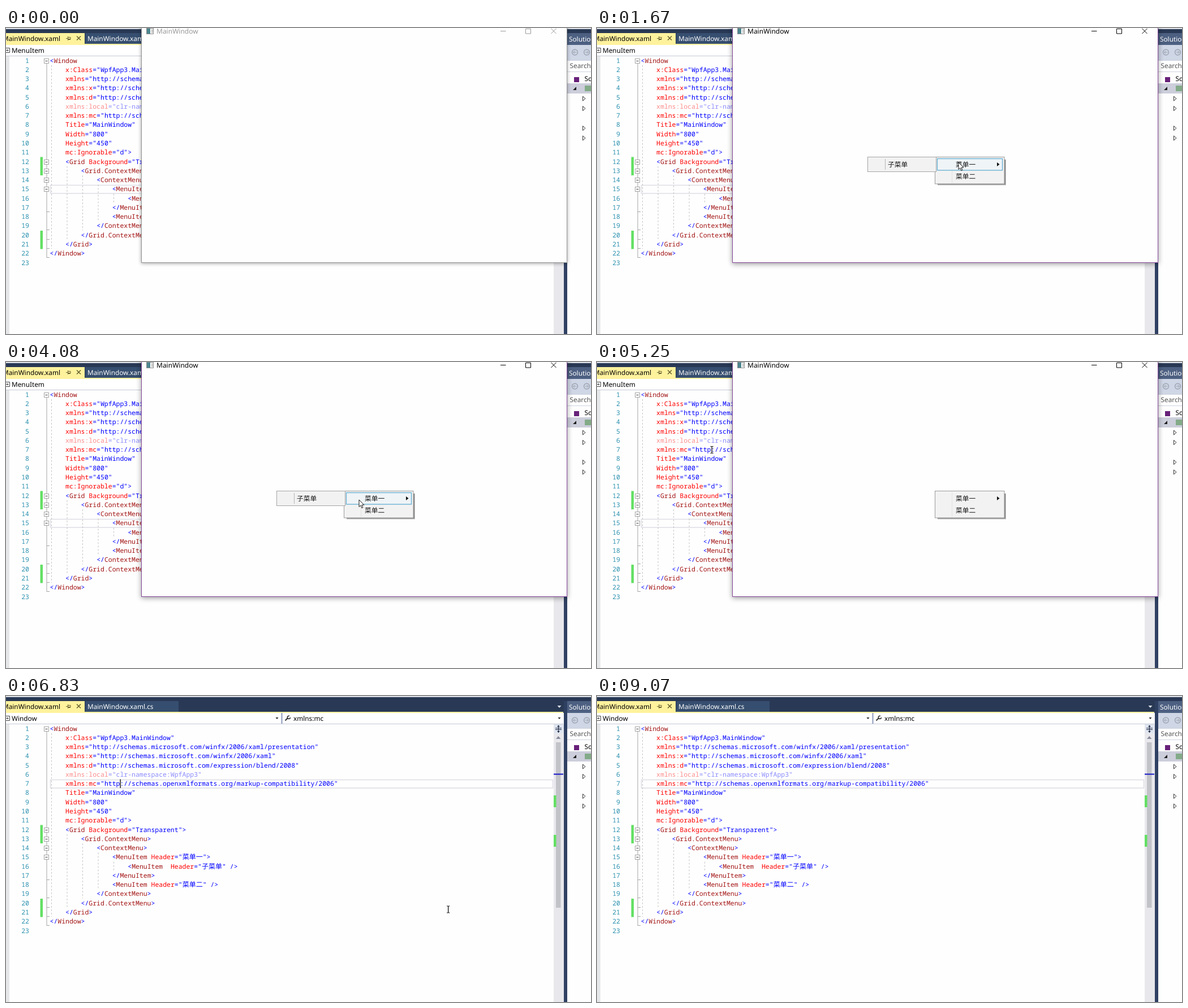
Write an HTML page that moves like this. It is 1034 by 542 pixels and loops after 9.45 s.

```html
<!DOCTYPE html>
<html lang="en">
<head>
<meta charset="utf-8">
<title>Context menu demo</title>
<style>
  html, body { margin: 0; width: 100%; height: 100%; overflow: hidden; background: #fff; }
  svg { display: block; width: 100%; height: 100%; }
  text { white-space: pre; text-rendering: geometricPrecision; }
  .ui { font: 11.8px "Noto Sans", "Open Sans", sans-serif; }
  .code { font: 11.48px "Noto Sans Mono", "DejaVu Sans Mono", monospace; }
  .cjk { font-family: "Noto Sans CJK SC", "Noto Sans CJK", sans-serif; font-size: 12px; }
  .item { font: 11.7px "Noto Sans CJK SC", "Noto Sans CJK", sans-serif; }
  #win .frame { stroke: #949494; filter: drop-shadow(0 1px 3px rgba(0, 0, 0, .36)); }
  #win.active .frame { stroke: #85479a; filter: drop-shadow(0 2px 5px rgba(0, 0, 0, .4)); }
  #win .chrome { color: #999; }
  #win.active .chrome { color: #000; }
</style>
</head>
<body>
<svg id="stage" viewBox="0 0 1034 542">
  <g id="shell"></g>
  <g id="editor"></g>
  <g id="panel"></g>
  <g id="win"></g>
  <g id="menu"></g>
  <g id="submenu"></g>
  <g id="pointer"></g>
</svg>
<script>
const NS = "http://www.w3.org/2000/svg";
const LOOP = 9450;
const $ = id => document.getElementById(id);

function add(parent, tag, attrs, text) {
  const node = document.createElementNS(NS, tag);
  for (const key in attrs) node.setAttribute(key, attrs[key]);
  if (text !== undefined) node.textContent = text;
  return parent.appendChild(node);
}
const group = parent => add(parent, "g", {});
const box = (p, x, y, width, height, fill, more) =>
  add(p, "rect", { x, y, width, height, fill, ...more });
const line = (p, d, stroke, more) =>
  add(p, "path", { d, stroke, fill: "none", ...more });
const shape = (p, d, fill, more) => add(p, "path", { d, fill, ...more });
const label = (p, x, y, str, fill, cls = "ui", more) =>
  add(p, "text", { x, y, fill, class: cls, ...more }, str);
const show = (node, on) => node.setAttribute("visibility", on ? "visible" : "hidden");

// Tabs and navigation bar
const shell = $("shell");
box(shell, 0, 0, 1034, 542, "#fefefe");
box(shell, 0, 0, 1034, 30, "#293955");
box(shell, 0, 0, 1034, 2, "#dfe3e8");
box(shell, 0, 9, 139, 20, "#fff29d");
box(shell, 140, 9, 165, 19, "#364e6f");
box(shell, 0, 28, 985, 2, "#fff29d");
label(shell, -6, 23, "MainWindow.xaml", "#000");
label(shell, 144, 23, "MainWindow.xaml.cs", "#fff");
line(shell, "M106 18.5h3M109.5 15v7M110 16.5h4v3h-4M110 20.5h4", "#6b6330");
line(shell, "M125 14.5l7 7M132 14.5l-7 7", "#5c5528", { "stroke-width": 1.3 });
shape(shell, "M974.5 17h7l-3.5 4z", "#dbe2ee");
box(shell, 0, 30, 985, 19, "#fff");
line(shell, "M0 49.5H985", "#c3c9d6");
line(shell, "M487.5 30V49", "#8e9bbc", { "stroke-width": 2 });
line(shell, "M0 35.5h6.5v8H0M0 39.5h4M2 37.5l2 2l-2 2", "#444");
shape(shell, "M476.5 38h5l-2.5 3zM975.5 38h5l-2.5 3z", "#222");
const navItem = label(shell, 10, 44, "MenuItem", "#000");
const navRight = group(shell);
line(navRight, "M493.5 43.5l4.5-4.5", "#333", { "stroke-width": 2 });
line(navRight, "M501 35.5a2.6 2.6 0 1 0 1.5 2.5", "#333", { "stroke-width": 1.7 });
label(navRight, 508, 44, "xmlns:mc", "#000");

// Editor surface
const editor = $("editor");
const ADV = 6.888, PITCH = 16.27;
const mid = n => 57.6 + (n - 1) * PITCH;
box(editor, 0, 50, 6, 492, "#e6e7e8");
box(editor, 968, 50, 18, 492, "#e8e8ec");
box(editor, 972, 82, 8.5, 293, "#c2c3c9");
box(editor, 969, 50, 16, 16, "#dfe5f0");
line(editor, "M971 57h11M971 59.5h11M976.5 52v13", "#1e2b45");
shape(editor, "M974 54.5l2.5-3l2.5 3zM974 62l2.5 3l2.5-3z", "#1e2b45");
shape(editor, "M972 76h8.5l-4.25-5z", "#868999");
for (const y of [176, 246]) box(editor, 968, y, 4.5, 21, "#63df63");
const caretMark = box(editor, 968, 137.5, 17, 2, "#1515c8");
for (const y of [228.5, 359]) box(editor, 60.5, y, 4.5, 32.5, "#63df63");

const current = box(editor, 78.5, 0, 888, 14.5, "none", { stroke: "#dcdce4", "stroke-width": 1.4 });

// Indent guides: column x, first and last line
for (const [x, a, b] of [[80.5, 2, 21], [108, 13, 20], [135.5, 14, 19], [163, 15, 18], [190.5, 16, 16]])
  line(editor, `M${x} ${mid(a) - 8}V${mid(b) + 8}`, "#c2c2c2", { "stroke-dasharray": "3 3" });

line(editor, "M72 58V407", "#a5a5a5");
for (const n of [17, 19, 20, 21, 22]) line(editor, `M72 ${Math.round(mid(n) + 7) + .5}h5`, "#a5a5a5");
for (const n of [1, 12, 13, 14, 15]) {
  const y = Math.round(mid(n)) + .5;
  box(editor, 67.5, y - 4, 8, 8, "#fff", { stroke: "#a5a5a5" });
  line(editor, `M69.5 ${y}h4`, "#444");
}

const source = [
  `<Window`,
  `    x:Class="WpfApp3.MainWindow"`,
  `    xmlns="http://schemas.microsoft.com/winfx/2006/xaml/presentation"`,
  `    xmlns:x="http://schemas.microsoft.com/winfx/2006/xaml"`,
  `    xmlns:d="http://schemas.microsoft.com/expression/blend/2008"`,
  `    xmlns:local="clr-namespace:WpfApp3"`,
  `    xmlns:mc="http://schemas.openxmlformats.org/markup-compatibility/2006"`,
  `    Title="MainWindow"`,
  `    Width="800"`,
  `    Height="450"`,
  `    mc:Ignorable="d">`,
  `    <Grid Background="Transparent">`,
  `        <Grid.ContextMenu>`,
  `            <ContextMenu>`,
  `                <MenuItem Header="菜单一">`,
  `                    <MenuItem  Header="子菜单" />`,
  `                </MenuItem>`,
  `                <MenuItem Header="菜单二" />`,
  `            </ContextMenu>`,
  `        </Grid.ContextMenu>`,
  `    </Grid>`,
  `</Window>`,
  ``
];
const tokens = /[\w:.]+(?==)|[\u4e00-\u9fff]+|"[^"\u4e00-\u9fff]*"?|[\w.]+|[<>\/=]+|\s+/g;
const BLUE = "#0000ff";

function tokenFill(tok, next) {
  if (!/^[\w:.]+$/.test(tok)) return BLUE;
  return next === "=" ? "#ff0000" : "#a31515";
}

source.forEach((src, i) => {
  const y = mid(i + 1) + 4;
  label(editor, 41, y, i + 1, "#2b91af", "code", { "text-anchor": "end" });
  const code = src.trimStart();
  const row = label(editor, 77.5 + (src.length - code.length) * ADV, y, "", BLUE, "code",
    { opacity: i === 5 ? .45 : 1 });
  for (const m of code.matchAll(tokens)) {
    const tok = m[0];
    const attrs = { fill: tokenFill(tok, code[m.index + tok.length]) };
    if (/[\u4e00-\u9fff]/.test(tok)) attrs.class = "cjk";
    add(row, "tspan", attrs, tok);
  }
});
const caret = box(editor, 201.5, 147.5, 1.3, 15.5, "#000");

// Side panel
const panel = $("panel");
box(panel, 986, 9, 6, 533, "#2f4163");
box(panel, 992, 9, 42, 21, "#4d6082");
label(panel, 995, 24, "Solution", "#fff");
box(panel, 992, 30, 42, 27, "#cfd6e5");
for (const [x, d] of [[1005.5, -1], [1026.5, 1]]) {
  add(panel, "circle", { cx: x, cy: 43, r: 5, fill: "none", stroke: "#9da4b2", "stroke-width": 1.4 });
  line(panel, `M${x - 3} 43h6M${x} 40.5l${3 * d} 2.5l${-3 * d} 2.5`, "#9da4b2");
}
box(panel, 992, 57, 42, 20, "#fff");
line(panel, "M992 57.5h42M992 77.5h42", "#cdd3df");
label(panel, 996.5, 71, "Search", "#555");
box(panel, 992, 78, 42, 464, "#fefefe");
box(panel, 1004, 87, 9, 9, "#68217a");
label(panel, 1022.5, 94, "Solution", "#000");
box(panel, 992, 98, 42, 18, "#cccedb");
shape(panel, "M1002 110h6v-6z", "#1e1e1e");
box(panel, 1023, 102, 11, 10, "#83ab88");
for (const y of [125, 142.5, 177.5, 195])
  line(panel, `M1019.5 ${y - 4}v8l4.5-4z`, "#333");

// Application window
const win = $("win");
box(win, 239.5, -10.5, 752, 426, "#fefefe", { class: "frame" });
box(win, 248.5, .5, 12, 10, "#fff", { stroke: "#8c8c8c" });
box(win, 249, 1, 6, 9, "#4c8790");
box(win, 257, 2, 2.5, 7, "#c4c4c4");
const chrome = group(win);
chrome.setAttribute("class", "chrome");
label(chrome, 266, 10, "MainWindow", "currentColor", "ui", { style: "font-size:12px" });
line(chrome, "M874 5.5h9.5M918.5 1.5h9v8.5h-9zM963.5 1l9 9M972.5 1l-9 9", "currentColor");

// Menus
const menu = $("menu");
box(menu, 602, 233, 121, 45.5, "#777", { opacity: .45 });
box(menu, 602, 233, 120, 44.5, "#777", { opacity: .75 });
box(menu, 597.5, 228.5, 122.5, 47.5, "#f2f2f2", { stroke: "#9a9a9a" });
line(menu, "M627.5 231V274", "#e2e2e2");
const hover = box(menu, 601.5, 231.5, 115, 20.5, "#eff4f7", { stroke: "#57a9cf", "stroke-width": 1.2 });
label(menu, 634, 245.5, "菜单一", "#111", "item");
label(menu, 634, 267, "菜单二", "#111", "item");
shape(menu, "M707 238v7l4.5-3.5z", "#111");

const submenu = $("submenu");
box(submenu, 478.5, 228.5, 121, 26, "#f2f2f2", { stroke: "#a5a5a5" });
line(submenu, "M509.5 232V251", "#b4b4b4");
label(submenu, 514, 245.5, "子菜单", "#111", "item");

// Pointers
const pointer = $("pointer");
const arrow = shape(pointer, "M0 0V12.5L2.9 9.9L4.9 14.6L6.9 13.7L4.9 9.2H8.8Z", "#fff",
  { stroke: "#000", "stroke-width": .9 });
const beam = line(pointer, "M-2.5-6h2M.5-6h2M0-6V6M-2.5 6h2M.5 6h2", "#000", { "stroke-width": 1.2 });

// Pointer moves: first step, last step, number of steps, end x, end y
const moves = [
  [270, 600, 5, 724, 229],
  [1210, 1440, 4, 645, 237],
  [1600, 1670, 2, 639, 238],
  [1750, 1900, 3, 634, 239],
  [2130, 2220, 2, 632, 239],
  [2760, 2990, 4, 627, 240],
  [3310, 3310, 1, 626, 241],
  [3540, 3690, 3, 624, 242],
  [3920, 4080, 3, 624, 244],
  [4550, 5170, 9, 203, 155.5],
  [5570, 5810, 4, 297.5, 237.5],
  [5890, 6510, 9, 650, 308],
  [6600, 7430, 12, 1045, 518]
];
const caretFlips = [5410, 5890, 6350, 6890, 7430, 7970, 8520, 9070];

function pointerAt(t) {
  let x = 870, y = 514;
  for (const [from, to, n, ex, ey] of moves) {
    if (t < from) break;
    const step = Math.min(n, Math.floor((t - from) / Math.max(1, to - from) * (n - 1)) + 1);
    x += (ex - x) * step / n;
    y += (ey - y) * step / n;
  }
  return [x, y];
}

function draw(t) {
  const within = (a, b) => t >= a && t < b;
  const open = t < 5410;

  show(win, open);
  win.setAttribute("class", t >= 600 ? "active" : "");
  show(menu, within(750, 5340));
  menu.setAttribute("opacity", t < 830 ? .35 : t < 910 ? .7 : 1);
  hover.setAttribute("opacity", within(1290, 4700) ? 1 : 0);
  show(submenu, within(1440, 4700));

  navItem.textContent = open ? "MenuItem" : "Window";
  show(navRight, !open);
  show(caretMark, !open);
  current.setAttribute("y", open ? 278.5 : 148.5);
  show(caret, caretFlips.filter(f => f <= t).length % 2);

  const [x, y] = pointerAt(t);
  const shown = within(270, 7430);
  const typing = x < (open ? 240 : 968);
  pointer.setAttribute("transform", `translate(${x} ${y})`);
  show(arrow, shown && !typing);
  show(beam, shown && typing);
}

const start = performance.now();
function tick() {
  draw((performance.now() - start) % LOOP);
  requestAnimationFrame(tick);
}
tick();
</script>
</body>
</html>
```
